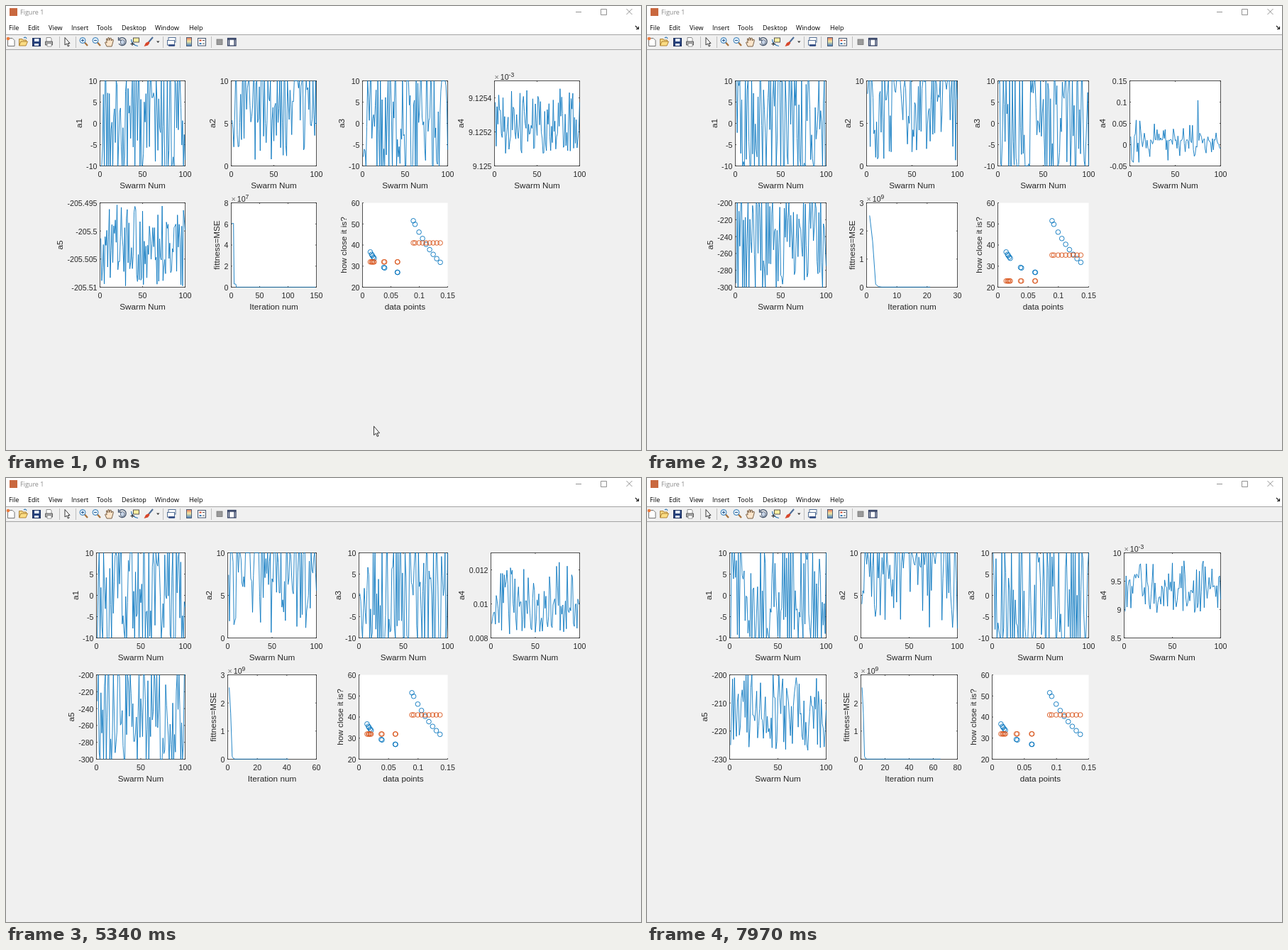
These frames come from a looping animation (895x626 px, 8 s). An HTML page:

```html
<!DOCTYPE html>
<html lang="en">
<head>
<meta charset="utf-8">
<title>Figure 1</title>
<style>
  html, body { margin: 0; width: 100%; height: 100%; overflow: hidden; background: #f0f0f0; }
  svg { display: block; }
  .ui { font: 9px "Open Sans", "Noto Sans", sans-serif; fill: #000; }
  .plots { font: 10.67px "Liberation Sans", Arial, sans-serif; fill: #262626; }
  .label { font-size: 11.73px; text-anchor: middle; }
  .mid { text-anchor: middle; }
  .end { text-anchor: end; }
  .sup { font-size: 8.5px; }
  .frame { fill: none; stroke: #262626; stroke-width: .8; }
  .line { fill: none; stroke: #0072bd; stroke-width: .85; stroke-linejoin: round; }
  .dots { fill: none; stroke-width: .9; }
  .thin { fill: none; stroke: #777; stroke-width: .8; }
  .blue { fill: none; stroke: #2f79b5; stroke-width: 1.2; }
</style>
</head>
<body>
<svg width="895" height="626" viewBox="0 0 895 626">
  <defs>
    <linearGradient id="bar" x2="0" y2="1">
      <stop stop-color="#e9755b"/><stop offset=".45" stop-color="#f4e8a0"/><stop offset="1" stop-color="#3d79c4"/>
    </linearGradient>
  </defs>
  <rect width="895" height="626" fill="#f0f0f0"/>
  <rect width="895" height="40" fill="#fff"/>
  <path d="M0 40.5H895M0 61.5H895" stroke="#a3a3a3"/>
  <rect x="5" y="3" width="11" height="11" fill="#c9683f"/>
  <text class="ui" x="20" y="11.5" style="fill:#888">Figure 1</text>
  <path class="thin" d="M803 8.5H811M838.5 4.5H846.5V12.5H838.5ZM874.5 4L882.5 12M882.5 4L874.5 12"/>
  <g class="ui" id="menu"></g>
  <path d="M887 28L891 32M891.5 29V32.5H888" fill="none" stroke="#222" stroke-width="1.2"/>

  <path d="M75.5 43V59M98.5 43V59M221.5 43V59M245.5 43V59M289.5 43V59" stroke="#bdbdbd"/>
  <path d="M2.5 45.5H9L12 48.5V56.5H2.5Z" fill="#fff" stroke="#666" stroke-width=".9"/>
  <circle cx="3" cy="46" r="2.3" fill="#ea7a3c"/>
  <path d="M18.5 56V46.5H23L24 48H28.5V50" fill="#f4d580" stroke="#a8792a" stroke-width=".9"/>
  <path d="M18.5 56L21 50H30.5L28 56Z" fill="#fbdd84" stroke="#a8792a" stroke-width=".9"/>
  <path d="M25 45Q28 43 29 46" class="blue"/>
  <rect x="37.5" y="45.5" width="11" height="11" fill="#28437d" stroke="#1c2f5c"/>
  <path d="M40 46H46.5V50H40ZM40 53H46V56H40Z" fill="#e4ecf7"/>
  <path d="M57 50V44.5H63L64 46V50" fill="#fff" stroke="#777" stroke-width=".8"/>
  <path d="M55.5 50H65.5V55H55.5Z" fill="#aaa" stroke="#555" stroke-width=".9"/>
  <path d="M58 53H64V57H58Z" fill="#fff" stroke="#777" stroke-width=".7"/>
  <path d="M83 44.5V55L85.5 53L87.3 57L89 56.2L87.2 52.5H90Z" fill="#fff" stroke="#222" stroke-width=".9"/>
  <g id="zooms"></g>
  <path d="M142 57L139.5 51.5Q140 50 142 52L141.5 46Q143 45 143.5 49L144 44.5Q146 43.5 146 48.5L147 45Q149 44.5 148.5 49L150 47Q152 47 151 50L149 57Z" fill="#fbe5cb" stroke="#6b5136" stroke-width=".9"/>
  <path d="M159.5 46.5A5.5 5.5 0 1 1 159 53M158.5 44V48H162.5" fill="none" stroke="#44546c" stroke-width="1.3"/>
  <path d="M161.5 49L164.5 47.5L167 49V53L164 54.5L161.5 53Z" fill="#c7d4e6" stroke="#44546c" stroke-width=".8"/>
  <rect x="179.5" y="45" width="8" height="6" fill="#fff0a0" stroke="#444" stroke-width=".9"/>
  <path d="M176.5 47Q177 55 186 56.5" class="blue"/>
  <path d="M178 51V56M175.5 53.5H181" stroke="#222"/>
  <path d="M207 44L201 51" stroke="#4c6c96" stroke-width="2"/>
  <path d="M201 50L197 52L194.5 57L200 55.5L202.5 52Z" fill="#d8472b"/>
  <path d="M212 49.5H216.5L214.2 52Z" fill="#333"/>
  <g fill="#fff" stroke="#44628c" stroke-width=".9">
    <rect x="229" y="44.5" width="10" height="6.5"/><rect x="227.5" y="48.5" width="10" height="6.5"/>
  </g>
  <path d="M230 55.5H237" stroke="#28437d" stroke-width="2.4" stroke-linecap="round"/>
  <rect x="254.5" y="44.5" width="7" height="12" fill="url(#bar)" stroke="#44546c" stroke-width=".9"/>
  <rect x="270.5" y="45.5" width="11" height="10.5" fill="#fff" stroke="#44546c"/>
  <path d="M272.5 48.5H275.5" stroke="#d8472b" stroke-width="2"/>
  <path d="M272.5 53H275.5" stroke="#2f79b5" stroke-width="2"/>
  <path d="M277 48.5H280M277 53H280" stroke="#555"/>
  <rect x="297" y="47" width="8" height="7.5" fill="#999" stroke="#777" stroke-width=".8"/>
  <rect x="312.5" y="45.5" width="11.5" height="10.5" fill="#fff" stroke="#28375c" stroke-width="1.2"/>
  <path d="M312.5 47H324M314.5 47V56M322 47V56" stroke="#28375c" stroke-width="1.3"/>

  <g class="plots" id="plots"></g>
  <path id="cursor" d="M518.5 592.5V605L521.3 602.5L523.3 607L525 606.2L523 602H526.5Z" fill="#fff" stroke="#222" stroke-width=".9"/>
</svg>
<script>
const $ = id => document.getElementById(id);
const LOOP = 8000;
const FINAL = 148; // iteration on show before the new run begins
const COLUMNS = [0, 185, 370, 556];
const ROWS = [[105.5, 225.5], [277.5, 396.5]];

$('menu').innerHTML = Object.entries({ File: 4, Edit: 31, View: 60, Insert: 92, Tools: 128,
  Desktop: 163, Window: 210, Help: 258 })
  .map(([s, x]) => `<text x="${x}" y="34">${s}</text>`).join('');

$('zooms').innerHTML = [[108, 'M106 48.5H110M108 46.5V50.5'], [126, 'M124 48.5H128']].map(([x, sign]) =>
  `<path d="M${x + 3} 51.5L${x + 7} 56" stroke="#a8713a" stroke-width="2.2"/>
   <circle cx="${x}" cy="48.5" r="4" fill="#e3f1fc" stroke="#2f79b5"/><path d="${sign}" stroke="#1f4f86"/>`).join('');

// Bursts of iterations: first time, last time, count.
const times = [[1160, 2160, 10], [2230, 3170, 10], [3320, 4330, 11], [4400, 5340, 10],
  [5490, 6490, 11], [6570, 7510, 10], [7660, 7970, 4]]
  .flatMap(([a, b, n]) => Array.from({ length: n }, (_, i) => a + (b - a) * i / (n - 1)));

const clamp = (v, lo, hi) => Math.min(hi, Math.max(lo, v));
const decay = (n, from, rate) => Math.exp(-rate * (n - from));

function random(seed) {
  let s = seed * 7919 + 12345 | 0;
  return () => {
    s = s + 0x6D2B79F5 | 0;
    let t = Math.imul(s ^ s >>> 15, 1 | s);
    t = t + Math.imul(t ^ t >>> 7, 61 | t) ^ t;
    return ((t ^ t >>> 14) >>> 0) / 4294967296;
  };
}

// One value per particle; rule(r, i) draws it from the random source.
function swarm(n, k, lo, hi, rule) {
  const r = random(n * 11 + k);
  return Array.from({ length: 100 }, (_, i) => [i + 1, clamp(rule(r, i + 1), lo, hi)]);
}
const free = r => 38 * r() - 19;
const upper = r => .5 + 13.5 * r() ** .75;

// a4 scatters widely at first, then closes in from above; one particle strays.
function a4(n) {
  const wide = 1.2 * decay(n, 11, .305);
  const span = .0042 * decay(Math.max(n, 50), 50, .095);
  return swarm(n, 4, -10, 10, (r, i) => {
    const stray = i === 75 && n < 30;
    const u = stray ? .7 : r(), g = stray ? 1.18 : 2 * r() - 1;
    return .00912515 + span * (u ** 1.3 - .2) + wide * g ** 3;
  });
}

function a5(n) {
  const span = 150 * decay(Math.max(n, 47.5), 47.5, .092);
  return swarm(n, 5, -300, -200, r => -205.4985 + span * (.22 - r()));
}

function fitness(n) {
  const rule = n === FINAL
    ? i => i < 5 ? 6.05e7 : i < 9 ? 3e6 : 1e5
    : i => [2.55e9, 1.63e9, 1e8, 2e7][i - 1] ?? 4e6;
  return Array.from({ length: n }, (_, i) => [i + 1, rule(i + 1)]);
}

const lowX = [.0137, .016, .0172, .019, .0205, .0375, .039, .0612, .062];
const highX = [.0895, .0925, ...Array.from({ length: 7 }, (_, i) => .0995 + .00625 * i)];
const measured = [
  ...lowX.map(x => [x, 26 + 10.7 * Math.exp((.0137 - x) / .0207)]),
  ...highX.map(x => [x, 51.5 - 570 * (x - .0895) + 3270 * (x - .0895) ** 2])];

function modelled(n) {
  const low = 32 - 117 * decay(n, 11, .256);
  const high = 41 - 119 * decay(n, 11, .29) + 3 * Math.exp(-(((n - 28) / 6) ** 2));
  return [...lowX.map(x => [x, low]), ...highX.map(x => [x, high])];
}

// Round axis limits and tick step: the finest 1-2-5 grid with few enough cells.
function nice(values, most = 5) {
  const lo = Math.min(...values), hi = Math.max(...values);
  for (let p = 10 ** (Math.floor(Math.log10(hi - lo)) - 1); ; p *= 10) {
    for (const m of [1, 2, 5]) {
      const cell = m * p;
      const a = Math.floor(lo / cell + 1e-6), b = Math.ceil(hi / cell - 1e-6);
      if (b - a <= most) return [a * cell, b * cell, b - a === 5 && m !== 2 ? 2 * cell : cell];
    }
  }
}
const ys = points => points.map(p => p[1]);

function ticks([lo, hi, step]) {
  const out = [], eps = step * 1e-4;
  for (let i = Math.ceil((lo - eps) / step); i * step <= hi + eps; i++) out.push(i * step);
  return out;
}

function exponent([lo, hi]) {
  const e = Math.floor(Math.log10(.99 * Math.max(Math.abs(lo), Math.abs(hi))));
  return e <= -3 || e > 3 ? e : 0;
}
const format = (v, exp) => String(+(v / 10 ** exp).toFixed(5));
const widthOf = s => [...s].reduce((w, c) => w + (c === '-' ? 3.55 : c === '.' ? 2.96 : 5.93), 0);

function axes({ col, row, left, x, y, xName, yName, data, dots }) {
  const x0 = left + COLUMNS[col], x1 = 252.5 + COLUMNS[col];
  const [y0, y1] = ROWS[row];
  const px = v => x0 + (v - x[0]) / (x[1] - x[0]) * (x1 - x0);
  const py = v => y1 - (v - y[0]) / (y[1] - y[0]) * (y1 - y0);
  const f = v => v.toFixed(1);
  const exp = exponent(y);
  let out = `<rect x="${x0}" y="${y0}" width="${x1 - x0}" height="${y1 - y0}" fill="#fff"/>`;
  let edge = data ? `M${x0} ${y0}H${x1}V${y1}H${x0}Z` : `M${x0} ${y0}V${y1}H${x1}`;
  let gap = 0;
  for (const v of ticks(x)) {
    const p = f(px(v));
    edge += `M${p} ${y1}v-1.5` + (data ? `M${p} ${y0}v1.5` : '');
    out += `<text class="mid" x="${p}" y="${y1 + 15.5}">${format(v, 0)}</text>`;
  }
  for (const v of ticks(y)) {
    const p = py(v), s = format(v, exp);
    gap = Math.max(gap, widthOf(s));
    edge += `M${x0} ${f(p)}h1.5` + (data ? `M${x1} ${f(p)}h-1.5` : '');
    out += `<text class="end" x="${x0 - 4}" y="${f(p + 4.4)}">${s}</text>`;
  }
  out += `<path class="frame" d="${edge}"/>`;
  if (exp) out += `<text x="${x0}" y="${y0 - 2}"><tspan fill="#777">×</tspan><tspan dx="2">10</tspan>` +
    `<tspan class="sup" dy="-4">${exp}</tspan></text>`;
  if (data) out += `<path class="line" d="M${data.map(([a, b]) => f(px(a)) + ' ' + f(py(b))).join('L')}"/>`;
  for (const [color, points] of dots || []) {
    out += `<g class="dots" stroke="${color}">` + points.map(([a, b]) =>
      `<circle cx="${f(px(a))}" cy="${f(py(b))}" r="3.3"/>`).join('') + '</g>';
  }
  return out + `<text class="label" x="${(x0 + x1) / 2}" y="${y1 + 31.5}">${xName}</text>` +
    `<text class="label" transform="translate(${f(x0 - gap - 10.5)} ${(y0 + y1) / 2}) rotate(-90)">${yName}</text>`;
}

// The left margin follows the room the tick labels take.
const margin = n => n === FINAL ? 132.5 : n > 62 ? 116.5 : n > 57 || n < 20 ? 122.5 : n < 25 ? 124.5 : 127.5;

function figure(n) {
  const left = margin(n);
  const param = (name, col, row, data, y = nice(ys(data))) =>
    ({ col, row, left, x: [0, 100, 50], y, xName: 'Swarm Num', yName: name, data });
  const fit = fitness(n), model = modelled(n);
  return [
    param('a1', 0, 0, swarm(n, 1, -10, 10, free), [-10, 10, 5]),
    param('a2', 1, 0, swarm(n, 2, 0, 10, upper), [0, 10, 5]),
    param('a3', 2, 0, swarm(n, 3, -10, 10, free), [-10, 10, 5]),
    param('a4', 3, 0, a4(n)),
    param('a5', 0, 1, a5(n)),
    { col: 1, row: 1, left, x: nice([0, n], 4), y: nice([0, ...ys(fit)]),
      xName: 'Iteration num', yName: 'fittness=MSE', data: fit },
    { col: 2, row: 1, left, x: [0, .15, .05], y: nice(ys([...measured, ...model])),
      xName: 'data points', yName: 'how close it is?', dots: [['#0072bd', measured], ['#d95319', model]] }
  ].map(axes).join('');
}

const start = performance.now();
let shown;
function draw() {
  const t = (performance.now() - start) % LOOP;
  const n = times.filter(at => at <= t + 20).length || FINAL;
  if (n !== shown) $('plots').innerHTML = figure(shown = n);
  $('cursor').style.display = t < 70 ? '' : 'none';
  requestAnimationFrame(draw);
}
draw();
</script>
</body>
</html>
```
